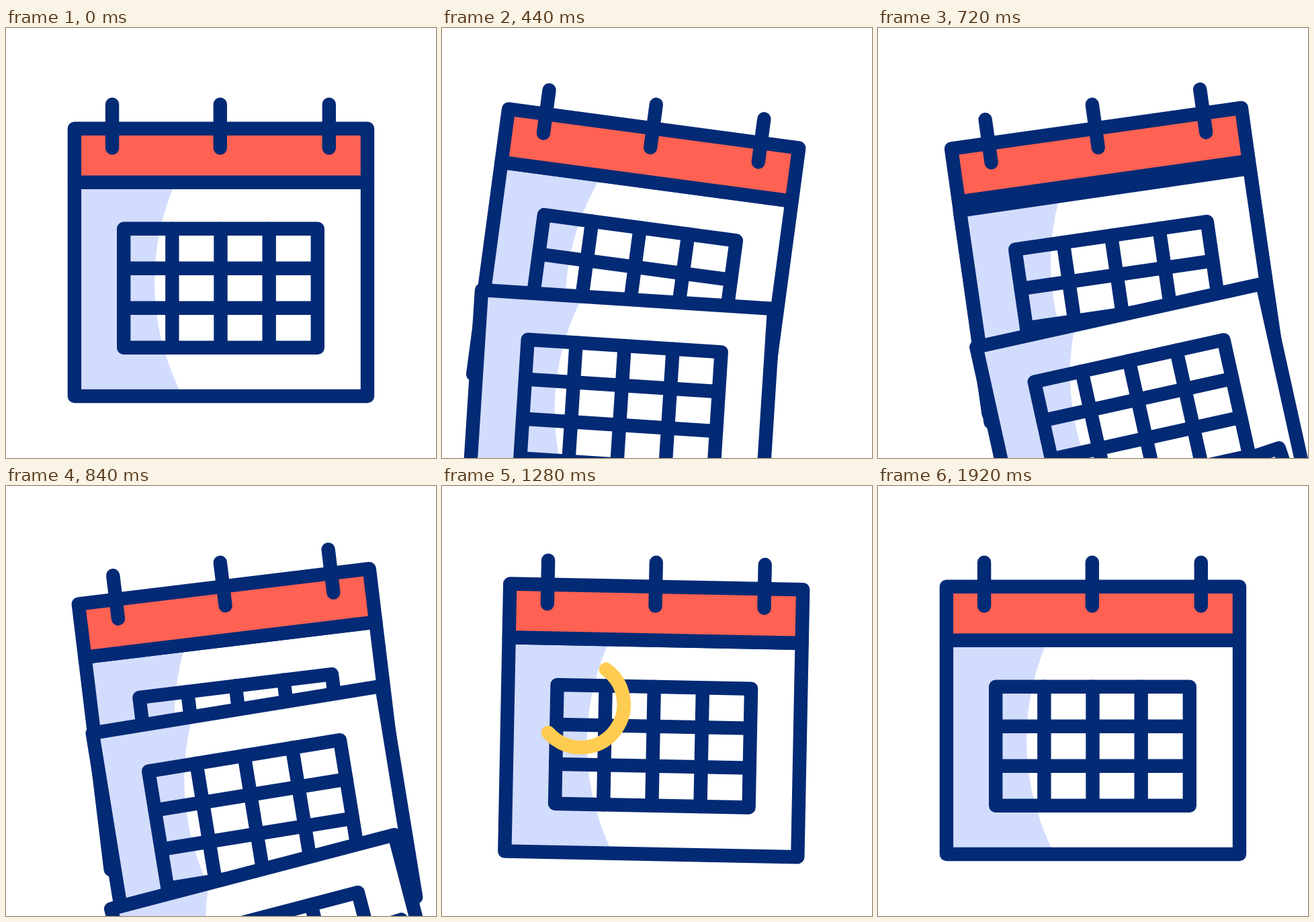
Write an HTML page with a canvas that moves like this. It is 640 by 640 pixels and loops after 2000 ms.

```html
<!DOCTYPE html>
<html lang="en">
<head>
<meta charset="utf-8">
<title>Calendar</title>
<style>
  html, body { margin: 0; width: 100%; height: 100%; overflow: hidden; background: #fff; }
  canvas { display: block; width: 640px; height: 640px; }
</style>
</head>
<body>
<canvas id="stage" width="640" height="640"></canvas>
<script>
const ctx = document.getElementById('stage').getContext('2d');
const NAVY = '#032a75', RED = '#ff6152', SHADE = '#d2dcfd', YELLOW = '#fecc51';
const LOOP = 2000, STEP = 40, RAD = Math.PI / 180;

const LEFT = 101.9, RIGHT = 538, TOP = 149.8, FOLD = 229.6, BOTTOM = 548;
const HANG = { x: 319, y: 114 };
const TURN = { x: 320, y: 293 };

// time and angle of each swing extreme
const SWING = [[80, 0], [348, 10], [760, -8.5], [1120, 4.1], [1365, 0]];
// sheets in stacking order, back to front
const DROPS = [665, 462, 201];
const DROP_TIME = 583, DROP = 484, TILT = -10.8;

function ease(t, from, to) {
  const u = Math.min(1, Math.max(0, (t - from) / (to - from)));
  return u * u * (3 - 2 * u);
}

function swing(t) {
  let angle = 0;
  for (let i = 1; i < SWING.length; i++) {
    const [t0, a0] = SWING[i - 1], [t1, a1] = SWING[i];
    angle += (a1 - a0) * ease(t, t0, t1);
  }
  return angle;
}

function rotateAt(p, degrees) {
  ctx.translate(p.x, p.y);
  ctx.rotate(degrees * RAD);
  ctx.translate(-p.x, -p.y);
}

function line(x1, y1, x2, y2) {
  ctx.beginPath();
  ctx.moveTo(x1, y1);
  ctx.lineTo(x2, y2);
  ctx.stroke();
}

function box(x1, y1, x2, y2, fill) {
  ctx.beginPath();
  ctx.rect(x1, y1, x2 - x1, y2 - y1);
  if (fill) {
    ctx.fillStyle = fill;
    ctx.fill();
  }
  ctx.stroke();
}

function drawSheet() {
  ctx.save();
  ctx.beginPath();
  ctx.rect(LEFT, FOLD, RIGHT - LEFT, BOTTOM - FOLD);
  ctx.fillStyle = SHADE;
  ctx.fill();
  ctx.clip();
  ctx.beginPath();
  ctx.arc(586, 378, 365, 0, 2 * Math.PI);
  ctx.fillStyle = '#fff';
  ctx.fill();
  ctx.restore();

  box(LEFT, FOLD, RIGHT, BOTTOM);
  box(175.2, 298.8, 463.8, 475.7);
  for (let i = 1; i < 4; i++) line(175.2 + i * 72.15, 298.8, 175.2 + i * 72.15, 475.7);
  for (let i = 1; i < 3; i++) line(175.2, 298.8 + i * 59, 463.8, 298.8 + i * 59);
}

function drawCalendar(t) {
  ctx.save();
  ctx.lineWidth = 20.4;
  ctx.lineCap = ctx.lineJoin = 'round';
  ctx.strokeStyle = NAVY;
  rotateAt(HANG, swing(t));
  drawSheet();
  for (const start of DROPS) {
    const p = ease(t, start, start + DROP_TIME);
    if (p === 0 || p === 1 && t > 1200) continue;
    ctx.save();
    ctx.translate(0, DROP * p);
    rotateAt(TURN, TILT * p);
    drawSheet();
    ctx.restore();
  }
  box(LEFT, TOP, RIGHT, FOLD, RED);
  for (const x of [158.1, 318.8, 480.8]) line(x, 113.8, x, 178.6);
  ctx.restore();
}

function drawRing(t) {
  const shift = 180 * ease(t, 1046, 1866) - 90;
  const from = 360 * ease(t, 1444, 1887) + shift;
  const to = 360 * ease(t, 1048, 1490) + shift;
  if (to - from < 0.01) return;
  ctx.beginPath();
  ctx.arc(206.5, 325, 64.2, from * RAD, to * RAD);
  ctx.lineWidth = 20.6;
  ctx.lineCap = 'round';
  ctx.strokeStyle = YELLOW;
  ctx.stroke();
}

function frame() {
  const t = Math.floor(performance.now() % LOOP / STEP) * STEP;
  ctx.fillStyle = '#fff';
  ctx.fillRect(0, 0, 640, 640);
  drawCalendar(t);
  drawRing(t);
  requestAnimationFrame(frame);
}
frame();
</script>
</body>
</html>
```
